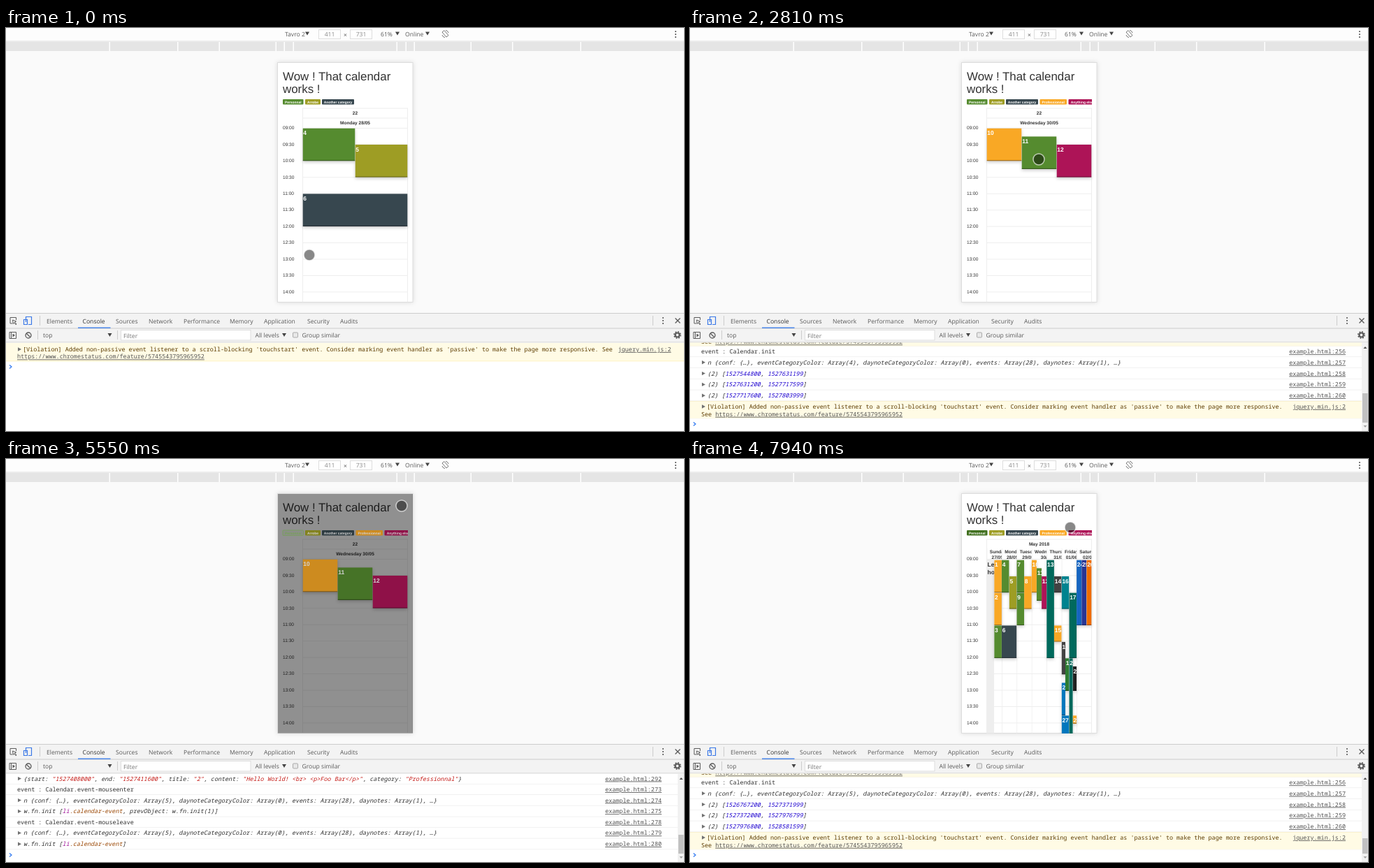
Recreate the animation shown at these times as an HTML page. Size 970 by 577 pixels, loop 8000 ms.

```html
<!DOCTYPE html>
<html lang="en">
<head>
<meta charset="utf-8">
<title>Calendar demo</title>
<style>
html, body { margin: 0; width: 100%; height: 100%; overflow: hidden; background: #fafafa }
svg { text-rendering: geometricPrecision }
body > svg { display: block; width: 100%; height: 100% }
.ui { font-family: 'Open Sans', sans-serif; fill: #5a5a5a }
.page { font-family: 'Liberation Sans', Arial, sans-serif; fill: #333 }
.mono { font-family: 'Noto Sans Mono', monospace; fill: #303030 }
.b { font-weight: bold }
.i { font-style: italic }
.u { text-decoration: underline }
</style>
</head>
<body>
<svg viewBox="0 0 970 577">
  <defs>
    <clipPath id="screen"><rect x="389" y="50" width="193" height="342.5"/></clipPath>
    <clipPath id="legend"><rect x="389" y="100" width="186" height="14"/></clipPath>
    <clipPath id="log"><rect y="450.5" width="970" height="127"/></clipPath>
  </defs>
  <g id="frame"></g>
  <g id="live"></g>
</svg>
<script>
const $ = id => document.getElementById(id);
const rect = (x, y, w, h, fill, more = '') =>
  `<rect x="${x}" y="${y}" width="${w}" height="${h}" fill="${fill}" ${more}/>`;
const path = (d, stroke, w = 1, fill = 'none') =>
  `<path d="${d}" stroke="${stroke}" stroke-width="${w}" fill="${fill}"/>`;
const text = (x, y, s, size, cls, more = '') =>
  `<text x="${x}" y="${y + size * .35}" font-size="${size}" class="${cls}" ${more}>${s}</text>`;
const ui = (x, y, s, more) => text(x, y, s, 8.6, 'ui', more);
const mid = 'text-anchor="middle"', end = 'text-anchor="end"';
const style = s => `style="${s}"`;
const ramp = (t, a, b) => Math.max(0, Math.min(1, (t - a) / (b - a)));
const ease = k => k * k * (3 - 2 * k);

// ---------- browser chrome ----------
const down = (x, y) => path(`M${x - 3} ${y - 2.5}h6l-3 5z`, 'none', 0, '#444');
const dots = (x, y) => [-4, 0, 4].map(d => `<circle cx="${x}" cy="${y + d}" r="1.1" fill="#5a5a5a"/>`).join('');
const field = (x, n) => rect(x, 2.5, 31, 13, '#fff', 'stroke="#ddd"') + ui(x + 15.5, 9, n, mid + style('fill:#888'));

function chrome() {
  let s = rect(0, 0, 970, 577, '#fafafa') + rect(0, 0, 970, 19, '#fdfdfd') + rect(0, 18.5, 970, 1, '#ddd');
  s += ui(399, 9, 'Tavro 2') + down(431, 8) + field(447.5, 411) + ui(485.5, 10, '×', mid) + field(492.5, 731);
  s += ui(536, 9, '61%') + down(560, 8) + ui(571, 9, 'Online') + down(603, 8) + dots(958, 9);
  s += path('M624 6l3-2.5 6 7-3 2.5zM624 10a5 5 0 0 0 4 3.6M633 7a5 5 0 0 0-4-3.8', '#666', .9);
  s += rect(0, 20, 970, 13, '#e5e5e5');
  for (const d of [337, 239.5, 180, 99, 87, 74])
    s += rect(484.5 - d, 20, 1.5, 13, '#fff') + rect(484.5 + d, 20, 1.5, 13, '#fff');

  s += rect(0, 408, 970, 42, '#f3f3f3') + rect(0, 408, 970, 1, '#ccc') + rect(0, 429.5, 970, 1, '#ccc');
  s += rect(0, 449.5, 970, 1, '#ccc') + rect(0, 450.5, 970, 126.5, '#fff');
  s += path('M9 423H6v-8.5h8.5V418M9.5 418l5 2-2 1 2.5 3-1 .8-2.4-3-1.4 1.8z', '#5a5a5a', 1);
  s += path('M28.5 421v-7.5h8v11H32M25.5 417.5h5v7h-5z', '#3b78e7', 1.2);
  s += rect(48, 412, 1, 14, '#ccc') + rect(925, 412, 1, 14, '#ccc') + rect(103, 428.5, 46.5, 1.5, '#4a86e8');
  const tabs = { Elements: 58, Console: 109.5, Sources: 157, Network: 204, Performance: 254, Memory: 320,
    Application: 369, Security: 431, Audits: 478 };
  for (const name in tabs) s += ui(tabs[name], 419.5, name, name == 'Console' ? style('fill:#333') : '');
  s += dots(940, 419) + path('M957.5 415.5l7 7m0-7l-7 7', '#5a5a5a', 1.4);

  s += path('M5 435.5h9.5v9H5zM7.5 435.5v9', '#5a5a5a', 1) + path('M9.5 437.5v5l3.5-2.5z', 'none', 0, '#5a5a5a');
  s += '<circle cx="32" cy="440" r="4" fill="none" stroke="#5a5a5a" stroke-width="1.3"/>' + path('M29.2 437.2l5.6 5.6', '#5a5a5a', 1.3);
  s += rect(45, 433, 1, 13, '#ccc') + ui(53, 440, 'top') + down(148.5, 439.5) + rect(159, 433, 1, 13, '#ccc');
  s += rect(164.5, 432.5, 185.5, 14.5, '#fff', 'stroke="#ddd"') + ui(168, 440.5, 'Filter', style('fill:#777'));
  s += ui(356.5, 440, 'All levels') + down(398, 439.5);
  s += rect(410.5, 436, 7, 7, '#e8e8e8', 'rx="1" stroke="#aaa"') + ui(423.5, 440, 'Group similar');
  s += '<circle cx="960.5" cy="439.5" r="3" fill="none" stroke="#5a5a5a" stroke-width="2.2"/>';
  s += '<circle cx="960.5" cy="439.5" r="4.7" fill="none" stroke="#5a5a5a" stroke-width="1.6" stroke-dasharray="1.9 1.79"/>';
  return s;
}

// ---------- calendar ----------
const colors = { green: '#558b2f', orange: '#f9a825', olive: '#9e9d24', slate: '#37474f', pink: '#ad1457', teal: '#00695c',
  dark: '#424242', cyan: '#00838f', forest: '#2e7d32', black: '#212121', blue: '#0277bd', royal: '#1565c0', indigo: '#283593', rust: '#ef6c00' };
const left = 424.5, width = 150, top0 = 143.5, row = 23.44, small = 6.57, large = 8.44;

// lane: one of `of` strips in a day; items are "title colour from to", times in half hours after 9:00
const events = [];
const lane = (day, sub, of, items) => items.split(', ').forEach(item => {
  const [title, color, from, to] = item.split(' ');
  events.push({ day, x: sub / of, w: 1 / of, title, color: colors[color], from: +from, to: +to });
});
lane(0, 1, 2, '1 orange 0 2, 2 orange 2 4, 3 green 4 6');
lane(1, 0, 2, '4 green 0 2');
lane(1, 1, 2, '5 olive 1 3');
lane(1, 0, 1, '6 slate 4 6');
lane(2, 0, 2, '7 green 0 2, 9 green 2 4');
lane(2, 1, 2, '8 orange 1 3');
lane(3, 0, 3, '10 orange 0 2');
lane(3, 2, 3, '12 pink 1 3');
lane(3, 1, 3, '11 green .5 2.5');
lane(4, 0, 2, '13 teal 0 6');
lane(4, 1, 2, '14 dark 1 2, 15 orange 4 5');
lane(5, 0, 2, '16 cyan 1 3, 27 blue 9.5 11');
lane(5, 1, 2, '17 teal 2 6');
lane(5, 0, 4, '18 dark 5 7, 22 blue 7.5 9.5');
lane(5, 1, 4, '19 forest 6 8');
lane(5, 2, 4, '20 teal 6 11');
lane(5, 3, 4, '21 black 6.5 8, 23 orange 9.5 10');
lane(6, 0, 3, '24 royal 0 4');
lane(6, 1, 3, '25 indigo 0 4');
lane(6, 2, 3, '26 rust 0 4');

const WEEK = 7;
const days = ['Sunday 27/05', 'Monday 28/05', 'Tuesday 29/05', 'Wednesday 30/05', 'Thursday 31/05', 'Friday 01/06', 'Saturday 02/06'];
const box = (x, y, w, h, body, opacity = 1) =>
  `<g opacity="${opacity}"><svg x="${x}" y="${y}" width="${w}" height="${h}">${body}</svg></g>`;

function grid(view) {
  let s = '';
  for (let k = 0; k < 11; k++) {
    const y = top0 - .5 + k * row, hour = 9 + (k >> 1);
    s += rect(left, y, width, 1, '#eee');
    s += text(396, y, String(hour).padStart(2, 0) + (k % 2 ? ':30' : ':00'), small, 'page');
  }
  s += rect(left, 114.5, width, 1, '#eee') + rect(left - .5, 114.5, 1, 278, '#eee') + rect(left + width - .5, 114.5, 1, 278, '#eee');
  s += text(499.5, 122, view == WEEK ? 'May 2018' : '22', small, 'page b', mid);
  if (view != WEEK) return s + rect(left, 128.5, width, 1, '#eee') + text(499.5, 136, days[view], small, 'page b', mid);
  const col = width / 7, shift = [7, 7, 8, 13, 10, 6, 9];
  days.forEach((d, n) => {
    const [name, date] = d.split(' ');
    s += rect(left + n * col, 128, .8, 265, '#eee');
    s += box(left + n * col, 127, col, 17, text(4.3, 5.7, name, small, 'page b') + text(shift[n], 13.5, date, small, 'page b'));
  });
  return s + box(left, top0 + .5, col / 2, 250, rect(0, 0, 11, 250, '#eee') +
    text(1, 7, 'Le', large, 'page b') + text(1, 18.5, 'ho', large, 'page b'));
}

function eventBoxes(view, t) {
  const week = view == WEEK, col = week ? width / 7 : width;
  const open = t > 5410 ? 0 : ease(ramp(t, 3000, 3300));
  const list = events.filter(e => week || e.day == view);
  if (open) list.sort((a, b) => (a.title == 11) - (b.title == 11));
  return list.map(e => {
    let x = left + (week ? e.day * col : 0) + e.x * col, w = e.w * col;
    const y = top0 + e.from * row + week, grow = e.title == 11 ? open : 0;
    let h = (e.to - e.from) * row, opacity = 1;
    if (grow) {
      x += (left - x) * grow;
      w += (width - w) * grow;
      h += (393 - y - h) * grow;
    }
    if (!week && e.title == 10) opacity = 1 - ramp(t, 6690, 6860);
    if (!week && (e.title == 11 || e.title == 12)) opacity = 1 - .8 * ramp(t, 7000, 7230);
    let body = rect(0, 0, w, h, e.color) + rect(0, h - 1.3, w, 1.3, '#0005') + text(.8, 7, e.title, large, 'page b', style('fill:#fff'));
    if (grow) [['09:15 - 10:15', 16], ['Hello World!', 35.5], ['Foo Bar', 44.5]].forEach(([line, ly]) =>
      body += text(.8, ly, line, small, 'page b', style(`fill:#fff;opacity:${grow * .8}`)));
    return box(x, y, w, h, body, opacity);
  }).join('');
}

const pills = [['Personnal', 396, 29.5, 'green'], ['Arrobe', 428, 22, 'olive'], ['Another category', 452, 46, 'slate'],
  ['Professionnal', 500.5, 38.5, 'orange'], ['Anything else', 541.5, 38.5, 'pink']];

function legend(view, t) {
  return pills.slice(0, Math.min(5, view + 2)).map(([name, x, w, color], n) => {
    let fill = colors[color], ink = '#fff', edge = 'none';
    if (n == 0 && t > 5410) {
      fill = '#41701f';
      if (t < 5650) fill = '#a9aca6', ink = edge = '#8cc665';
    }
    if (n == 3 && view == 3 && t > 6700) fill = '#e2e2e2';
    return rect(x, 102, w, 7.6, fill, `rx="1" stroke="${edge}" stroke-width=".8"`) +
      text(x + w / 2, 105.8, name, 4.93, 'page b', mid + style('fill:' + ink));
  }).join('');
}

function dialog(t) {
  const k = t < 5420 ? ease(ramp(t, 3300, 3650)) : 0;
  if (!k) return '';
  return `<g opacity="${k}" transform="translate(0 ${-40 * (1 - k)})">` +
    rect(394, 55, 183, 105, '#fff', 'rx="2.5" style="filter:drop-shadow(0 2px 3px #0008)"') +
    rect(394, 85, 183, .8, '#e5e5e5') + text(401, 70, '11', 10.3, 'page') +
    text(566.5, 67, '×', 9, 'page b', mid + style('fill:#ccc')) +
    text(401, 102, '09:15 - 10:15', 6.4, 'page', style('fill:#888')) +
    text(401, 133, 'Hello World!', small, 'page') + text(401, 142.5, 'Foo Bar', small, 'page') + '</g>';
}

function phone(view, t) {
  const closing = t > 5410;
  const shade = closing ? Math.max(0, Math.min(.7, (5700 - t) / 150 * .44)) : .74 * ramp(t, 3100, 3350);
  const cover = rect(389, 50, 193, 343, closing ? '#000' : '#3b5a1f', `opacity="${shade}"`);
  const dim = closing ? 1 - shade * .4 : 1;
  return rect(388.5, 49.5, 193.5, 343, '#fff', 'stroke="#ddd" style="filter:drop-shadow(0 0 3px #0002)"') +
    '<g clip-path="url(#screen)">' +
    text(396, 69.2, 'Wow ! That calendar', 16.9, 'page') + text(396, 87.4, 'works !', 16.9, 'page') +
    grid(view) + (closing ? cover : '') +
    `<g style="filter:brightness(${dim})"><g clip-path="url(#legend)">${legend(view, t)}</g></g>` +
    `<g style="filter:brightness(${dim}) drop-shadow(0 2px 2px #0003)">${eventBoxes(view, t)}</g>` +
    (closing ? '' : cover) + dialog(t) + '</g>';
}

// ---------- console ----------
const mono = (x, y, s, cls = '', more = '') => text(x, y, s, 8.44, 'mono ' + cls, more);
const ink = (fill, s) => `<tspan style="fill:${fill}">${s}</tspan>`;
const link = (x, y, s) => mono(x, y, s, 'u', end + style('fill:#545454'));
const brown = style('fill:#5c3c00');
const url = '<tspan class="u" style="fill:#545454">https://www.chromestatus.com/feature/5745543795965952</tspan>';
const arrow = y => path(`M17 ${y - 2.7}v5.4l5-2.7z`, 'none', 0, '#727272');
const prompt = y => path(`M5 ${y - 2.6}l3 2.6-3 2.6`, '#367cf1', 1.3);
const warning = kind => `[Violation] Added non-passive event listener to a scroll-blocking '${kind}' event. ` +
  `Consider marking event handler as 'passive' to make the page more responsive.`;

const said = (name, line) => ({ h: 15.2, draw: y => mono(16, y + 7.7, 'event : Calendar.' + name) + link(938, y + 7.7, 'example.html:' + line) });
const value = (body, line) => ({ h: 15.8, draw: y => arrow(y + 8) + mono(25, y + 8, body, 'i') + link(938, y + 8, 'example.html:' + line) });
const violation = kind => ({ h: 25, draw: y => rect(0, y, 961, 25, '#fffbe5') + rect(0, y, 961, .8, '#fff2b8') + arrow(y + 8) +
  mono(24, y + 8, warning(kind), '', brown) + mono(16, y + 18.8, 'See ' + url, '', brown) + link(938, y + 8, 'jquery.min.js:2') });

const conf = (n, line) => value(`n {conf: {…}, eventCategoryColor: Array(${n}), daynoteCategoryColor: Array(0), events: Array(28), daynotes: Array(1), …}`, line);
const item = ink('#a0179a', 'li') + ink('#994500', '.calendar-event');
const node = (line, prev = ', prevObject: w.fn.init(1)') => value(`w.fn.init [${item}${prev}]`, line);
const str = s => ink('#c41a16', `"${s}"`);
const clicked = value(`{start: ${str(1527408000)}, end: ${str(1527411600)}, title: ${str(2)}, content: ` +
  `${str('Hello World! &lt;br&gt; &lt;p&gt;Foo Bar&lt;/p&gt;')}, category: ${str('Professionnal')}}`, 292);
const range = (a, b, line) => value(`(2) [${ink('#1c00cf', a)}, ${ink('#1c00cf', b)}]`, line);
const init = (n, start, step) => [violation('touchstart'), said('init', 256), conf(n, 257),
  ...[0, 1, 2].map(i => range(start + i * step, start + (i + 1) * step - 1, 258 + i)), violation('touchstart')];

const enter = [said('event-mouseenter', 273), conf(5, 274), node(275)];
const leave = [said('event-mouseleave', 278), conf(5, 279), node(280, '')];
const click = [said('event-click', 289), conf(5, 290), node(291), clicked];
// start time, top of the scroll thumb, rows
const logs = [
  [860, 491, init(3, 1527458400, 86400)],
  [1850, 523, init(4, 1527544800, 86400)],
  [3200, 536, [...click, ...enter]],
  [5450, 538, [clicked, ...enter, ...leave]],
  [5700, 540, [...enter, ...leave, violation('touchmove')]],
  [7750, 543, init(5, 1526767200, 604800)]
];

function consoleLog(t) {
  const log = logs.filter(l => t >= l[0]).pop();
  if (!log) return rect(0, 451, 970, 26, '#fffbe5') + rect(0, 476.5, 970, .8, '#fff2b8') + arrow(460) +
    mono(24, 460, warning('touchstart') + ' See', '', brown) + mono(16, 470.5, url) +
    link(951.5, 460, 'jquery.min.js:2') + prompt(485);
  let y = 559, s = '';
  for (const r of [...log[2]].reverse()) {
    s += rect(0, y - .5, 961, .8, '#eee');
    y -= r.h;
    s += r.draw(y);
  }
  return `<g clip-path="url(#log)">${s}</g>` + prompt(567) + rect(961, 450.5, 9, 127, '#f1f1f1') +
    rect(962, log[1], 7.5, 565 - log[1], '#c1c1c1') +
    path('M963.5 459l2.5-3 2.5 3z', 'none', 0, '#505050') + path('M963.5 569l2.5 3 2.5-3z', 'none', 0, '#a3a3a3');
}

// ---------- pointer and clock ----------
const route = [[0, 434, 325], [60, 434, 325], [380, 519, 324], [530, 519, 324], [860, 432, 321], [980, 432, 321], [1330, 556, 318],
  [1480, 556, 318], [1850, 427, 314], [2180, 427, 314], [2500, 556, 117], [2810, 499, 188], [3350, 499, 188], [3750, 475, 266],
  [3830, 475, 272], [4190, 475, 272], [4380, 537, 123], [4710, 574, 70], [5000, 574, 70], [5170, 566, 67], [5560, 566, 67],
  [5860, 545, 95], [6000, 545, 95], [6470, 519, 105], [6700, 519, 105], [6860, 531, 62], [6990, 531, 62], [7240, 482, 124],
  [7560, 482, 124], [7940, 544, 98], [8000, 544, 98]];

function pointer(t) {
  const n = route.findIndex(p => p[0] > t), a = route[n - 1], b = route[n];
  const k = ramp(t, a[0], b[0]), at = i => a[i] + (b[i] - a[i]) * k;
  return `<circle cx="${at(1)}" cy="${at(2)}" r="8" fill="#0007" stroke="#fff" stroke-opacity=".65" stroke-width="1.5"/>`;
}

function draw(now) {
  const t = now % 8000;
  const view = t < 860 ? 1 : t < 1850 ? 2 : t < 7750 ? 3 : WEEK;
  $('live').innerHTML = phone(view, t) + consoleLog(t) + pointer(t);
  requestAnimationFrame(draw);
}

$('frame').innerHTML = chrome();
const begin = performance.now();
const tick = draw;
draw(0);
</script>
</body>
</html>
```
